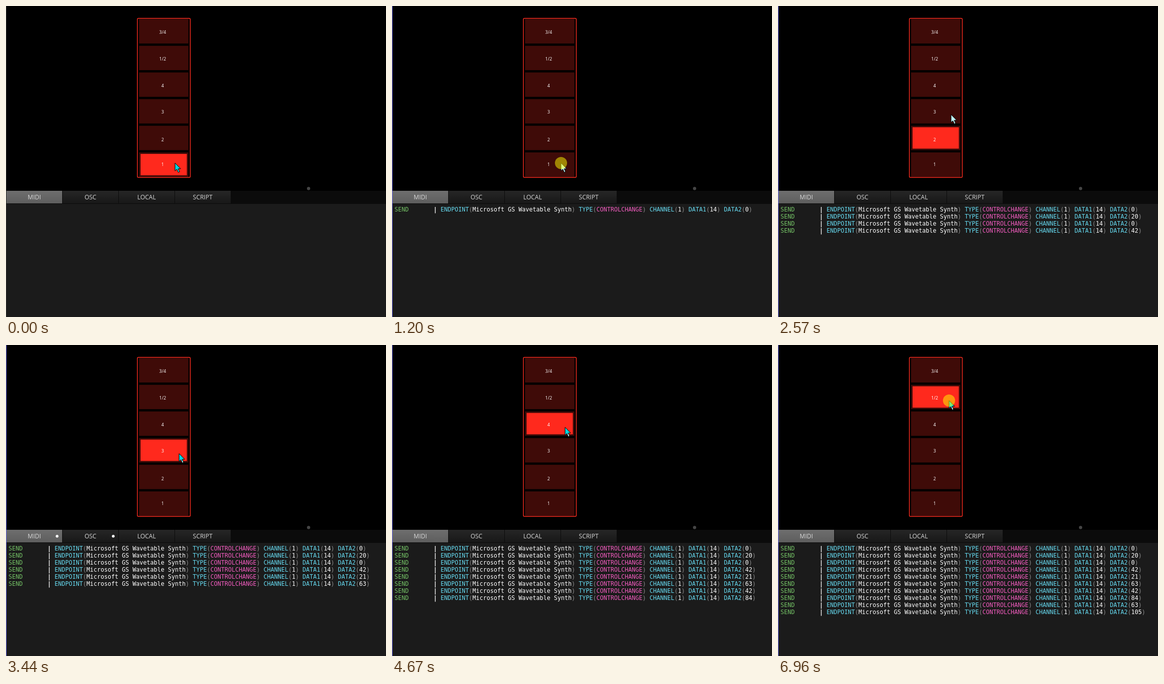
An HTML page that plays this animation: 751x616 px, repeating every 7490 ms.

```html
<!DOCTYPE html>
<html lang="en">
<head>
<meta charset="utf-8">
<title>Controller pads and message log</title>
<style>
  html, body { margin: 0; width: 100%; height: 100%; overflow: hidden; background: #000; }
  svg { display: block; }
  .label { font: 9px "Open Sans", sans-serif; fill: #fff; text-anchor: middle; }
  .tab { font: 12px "Open Sans", sans-serif; fill: #d6d6d6; text-anchor: middle; }
  .log { font: 11.63px "DejaVu Sans Mono", monospace; white-space: pre; fill: #fff; }
  .send { fill: #74c266; }
  .bar { font-weight: bold; }
  .key { fill: #66d9ef; }
  .paren { fill: #8c8c8c; }
  .type { fill: #f25cbf; }
  #cursorFill { mix-blend-mode: difference; }
</style>
</head>
<body>
<svg id="stage" width="751" height="616" viewBox="0 0 751 616">
  <defs>
    <linearGradient id="tabOn" x2="0" y2="1">
      <stop stop-color="#6e6e6e"/><stop offset="1" stop-color="#5e5e5e"/>
    </linearGradient>
    <linearGradient id="tabOff" x2="0" y2="1">
      <stop stop-color="#262626"/><stop offset="1" stop-color="#181818"/>
    </linearGradient>
  </defs>
  <rect width="751" height="616"/>
  <g id="pads"></g>
  <rect x="259.6" y="24.5" width="104.6" height="315" rx="2" fill="none" stroke="#ff2d20" stroke-width="1.4"/>
  <circle cx="598" cy="361.5" r="3.2" fill="#454545"/>
  <rect y="366" width="751" height="26" fill="#0b0b0b"/>
  <rect y="392" width="751" height="224" fill="#1b1b1b"/>
  <g id="tabs"></g>
  <g id="dots" fill="#fff">
    <circle cx="101" cy="378.8" r="2.7"/>
    <circle cx="212" cy="378.8" r="2.7"/>
  </g>
  <g id="log"></g>
  <rect id="focus" width="1" height="616"/>
  <path id="cursorFill" fill="#fff"/>
  <path id="cursorEdge" fill="none" stroke="#000"/>
  <circle id="press" r="12" fill="#ff0" fill-opacity=".5"/>
</svg>
<script>
const LOOP = 7490;
const STEP = 66;
const $ = id => document.getElementById(id);

function add(parent, tag, attrs, text = "") {
  const node = document.createElementNS("http://www.w3.org/2000/svg", tag);
  for (const name in attrs) node.setAttribute(name, attrs[name]);
  node.textContent = text;
  parent.append(node);
  return node;
}
const show = (node, visible) => node.setAttribute("visibility", visible ? "visible" : "hidden");

// Pads run from bottom to top.
const padLabels = [["1", 317], ["2", 268], ["3", 213], ["4", 161], ["1/2", 108], ["3/4", 55]];
const lights = padLabels.map(([label, baseline], i) => {
  const y = 290 - 52.8 * i;
  add($("pads"), "rect", { x: 263, y, width: 97.6, height: 48.3, fill: "#3f0b08" });
  const light = add($("pads"), "rect", { x: 266, y: y + 3, width: 91.4, height: 42.3, fill: "#ff291d" });
  add($("pads"), "text", { x: 309.6, y: baseline, class: "label" }, label);
  return light;
});

["MIDI", "OSC", "LOCAL", "SCRIPT"].forEach((name, i) => {
  const fill = i ? "url(#tabOff)" : "url(#tabOn)";
  add($("tabs"), "rect", { x: 111 * i + 1, y: 366, width: 110, height: 25, fill });
  add($("tabs"), "text", { x: 111 * i + 56 - i * 0.1, y: 383, class: "tab" }, name);
});

// A press shows the ring at `down`; pad and log react at `sent`.
const presses = [
  { down: 400, sent: 470, pad: -1, values: [0] },
  { down: 1200, sent: 1270, pad: 0, values: [20] },
  { down: 2010, sent: 2080, pad: 1, values: [0, 42] },
  { down: 3370, sent: 3440, pad: 2, values: [21, 63] },
  { down: 4530, sent: 4600, pad: 3, values: [42, 84] },
  { down: 6830, sent: 6960, pad: 4, values: [63, 105], held: true }
];

function addLogLine(value, row) {
  const line = add($("log"), "text", { x: 5, y: 407 + 14 * row, class: "log" });
  const span = (text, kind) => add(line, "tspan", { class: kind }, text);
  const field = (key, content, kind = "") => {
    span(" " + key, "key");
    span("(", "paren");
    span(content, kind);
    span(")", "paren");
  };
  span("SEND       ", "send");
  span("|", "bar");
  field("ENDPOINT", "Microsoft GS Wavetable Synth");
  field("TYPE", "CONTROLCHANGE", "type");
  field("CHANNEL", "1");
  field("DATA1", "14");
  field("DATA2", value);
  return line;
}
let row = 0;
const logLines = presses.flatMap(({ sent, values }) =>
  values.map(value => ({ sent, node: addLogLine(value, row++) })));

const moves = [
  { at: 1740, steps: 4, x: 341, y: 274 },
  { at: 2290, steps: 5, x: 342, y: 215 },
  { at: 4110, steps: 6, x: 342, y: 163 },
  { at: 5540, steps: 1, x: 341, y: 163 },
  { at: 5810, steps: 6, x: 338, y: 110 }
];
const easeOut = p => 1 - (1 - p) ** 2;

function cursorAt(t) {
  let x = 334, y = 311;
  for (const move of moves) {
    if (t < move.at) break;
    const step = Math.min(move.steps, Math.floor((t - move.at) / STEP) + 1);
    const p = easeOut(step / move.steps);
    x += (move.x - x) * p;
    y += (move.y - y) * p;
  }
  return [Math.round(x), Math.round(y)];
}

for (const id of ["cursorFill", "cursorEdge"])
  $(id).setAttribute("d", "M0 0V15.5L3.6 12.3L6.4 18.5L9 17.4L6.3 11.3H11Z");

function render(t) {
  const [x, y] = cursorAt(t);
  for (const id of ["cursorFill", "cursorEdge", "press"])
    $(id).setAttribute("transform", `translate(${x} ${y})`);

  const latest = presses.filter(p => t >= p.sent).pop();
  const activePad = latest ? latest.pad : 0;
  lights.forEach((light, i) => show(light, i === activePad));
  logLines.forEach(({ sent, node }) => show(node, t >= sent));
  show($("press"), presses.some(p => t >= p.down && (p.held || t < p.sent)));
  show($("dots"), latest && !latest.held && t < latest.sent + 70);
  $("focus").setAttribute("fill", t >= presses[0].down ? "#6c6cf0" : "#333");
}

const start = performance.now();
function tick() {
  render((performance.now() - start) % LOOP);
  requestAnimationFrame(tick);
}
tick();
</script>
</body>
</html>
```
